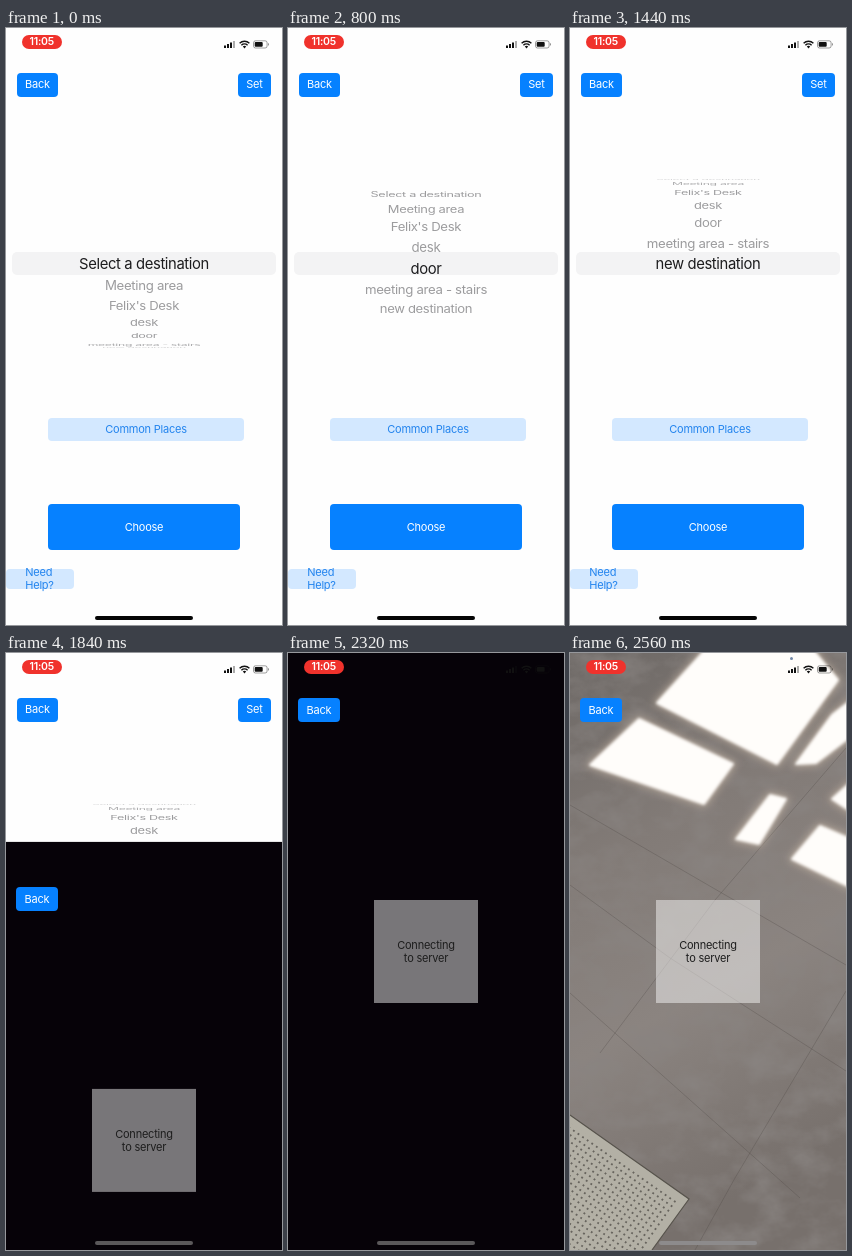
Recreate the animation shown at these times as an HTML page. Size 276 px wide and 597 px high, loop 2.64 s.

```html
<!DOCTYPE html>
<html lang="en">
<head>
<meta charset="utf-8">
<title>Destination picker</title>
<style>
html, body { margin: 0; width: 100%; height: 100%; overflow: hidden; }
body { background: #fefefe; }
#stage {
  position: relative; width: 276px; height: 597px; overflow: hidden;
  background: #fefefe; font: 11px/13px Inter, sans-serif; letter-spacing: -.02em;
}
#stage div, #stage svg { position: absolute; }
.btn {
  display: flex; align-items: center; justify-content: center;
  border-radius: 4px; background: #0681ff; color: #fff;
}
.soft { background: #d3e8ff; color: #2384ee; }
.back { left: 11px; top: 45px; width: 41px; height: 23.5px; }
.set { left: 232px; top: 45px; width: 33px; height: 23.5px; }
.common { left: 42px; top: 390px; width: 196px; height: 23px; }
.choose { left: 42px; top: 476px; width: 192px; height: 46px; }
.help { left: 0; top: 540.5px; width: 67.5px; height: 20.5px; }
.help span { width: 29px; }

.row {
  left: 0; width: 276px; top: -11px; line-height: 22px; text-align: center;
  white-space: nowrap; letter-spacing: -.025em;
}
#wheel { left: 0; top: 235.5px; font-size: 13.3px; color: #9b9b9d; }
#band {
  left: 6px; top: 224px; width: 264px; height: 23px; border-radius: 5px;
  background: #f3f3f4; overflow: hidden; font-size: 14.8px; color: #1c1c1e;
}
#lens { left: -6px; top: 11.5px; }

#sheet { left: 0; top: 0; width: 276px; height: 597px; background: #060208; }
#sheet .back { left: 10px; width: 42px; height: 24px; }
.card {
  left: 86px; top: 247px; width: 104px; height: 103px;
  display: flex; align-items: center; justify-content: center; text-align: center;
  background: rgba(255, 255, 255, .46); color: #1d1d1d;
}
.clock {
  left: 15.5px; top: 7px; width: 40.5px; height: 14px; border-radius: 7px;
  background: #f0322c; color: #fff; font-size: 10.5px; font-weight: 600;
  line-height: 14px; text-align: center;
}
#home { left: 89px; top: 588.3px; width: 98px; height: 3.4px; border-radius: 2px; }
</style>
</head>
<body>
<div id="stage">
  <div class="btn back">Back</div>
  <div class="btn set">Set</div>
  <div id="wheel"></div>
  <div id="band"><div id="lens"></div></div>
  <div class="btn soft common">Common Places</div>
  <div class="btn choose">Choose</div>
  <div class="btn soft help"><span>Need Help?</span></div>

  <div id="sheet">
    <svg id="camera" width="276" height="597" viewBox="0 0 276 597">
      <defs>
        <linearGradient id="floor" x1="0" y1="0" x2=".25" y2="1">
          <stop offset="0" stop-color="#6d6865"/>
          <stop offset=".35" stop-color="#827b77"/>
          <stop offset=".65" stop-color="#8b8480"/>
          <stop offset="1" stop-color="#77706c"/>
        </linearGradient>
        <filter id="mottle" x="0" y="0" width="100%" height="100%">
          <feTurbulence type="fractalNoise" baseFrequency=".028 .04" numOctaves="5" seed="8"/>
          <feColorMatrix values="0 0 0 0 .25  0 0 0 0 .23  0 0 0 0 .22  1.6 0 0 0 -.62"/>
        </filter>
        <filter id="blur"><feGaussianBlur stdDeviation="1.6"/></filter>
        <filter id="glow"><feGaussianBlur stdDeviation="4"/></filter>
        <pattern id="holes" width="5.6" height="5.6" patternUnits="userSpaceOnUse" patternTransform="rotate(35)">
          <circle cx="2.8" cy="2.8" r="1" fill="#55524c"/>
        </pattern>
        <path id="sun" d="M87 50L136 -4H242L268 27L207 111Z
          M20 112L69 66L163 111L134 151Z
          M166 186L189 191L216 146L200 142Z
          M226 111L262 62L280 48V84L246 110Z
          M222 206L250 173L280 186V234Z
          M262 146L280 130V158Z"/>
      </defs>
      <rect width="276" height="597" fill="url(#floor)"/>
      <rect width="276" height="597" filter="url(#mottle)"/>
      <path d="M0 152L276 312M0 232L100 305L276 418M0 340L230 545M276 95L145 247L30 400M276 338L165 525L125 597"
        fill="none" stroke="#4d4744" stroke-opacity=".35" stroke-width=".9"/>
      <use href="#sun" fill="#d9c5b0" stroke="#d9c5b0" stroke-width="5" opacity=".6" filter="url(#glow)"/>
      <use href="#sun" fill="#fffdfa" stroke="#fffdfa" stroke-width="2" stroke-linejoin="round" filter="url(#blur)"/>
      <path d="M0 462L119 546L82 597H0Z" fill="#b3b0a5"/>
      <path d="M0 470L109 547L74 597H0Z" fill="url(#holes)"/>
      <path d="M0 462L119 546L82 597" fill="none" stroke="#57534c" stroke-width="1.2"/>
      <circle cx="221.5" cy="5.5" r="1.5" fill="#7389a8"/>
    </svg>
    <div class="card">Connecting<br>to server</div>
    <div class="btn back">Back</div>
  </div>

  <div class="clock">11:05</div>
  <svg width="276" height="30" fill="#111">
    <path d="M218 17.5h2v2.5h-2zM221 16h2v4h-2zM224 14.5h2v5.5h-2z"/>
    <path d="M227 13h2v7h-2z" opacity=".35"/>
    <path d="M233.6 15.2a7 7 0 0 1 9.8 0M235.4 17.2a4.4 4.4 0 0 1 6.2 0" fill="none" stroke="#111" stroke-width="1.4"/>
    <path d="M236.8 18.6a2.5 2.5 0 0 1 3.4 0L238.500 20.400Z"/>
    <rect x="247.500" y="12.800" width="13.600" height="7.200" rx="2" fill="none" stroke="#111" stroke-opacity=".5" stroke-width=".8"/>
    <rect x="248.700" y="14" width="8" height="4.800" rx="1"/>
    <path d="M262 15a1.500 1.500 0 0 1 0 2.800z" opacity=".5"/>
  </svg>
  <div id="home"></div>
</div>

<script>
const LOOP = 2640, STEP = 80;
const RADIUS = 84, PITCH = 14.7 * Math.PI / 180;
const NAMES = ['Select a destination', 'Meeting area', 'Felix\'s Desk', 'desk', 'door',
  'meeting area - stairs', 'new destination'];

const $ = id => document.getElementById(id);
const clamp = x => Math.min(1, Math.max(0, x));

function fill(box) {
  return NAMES.map(name => {
    const row = document.createElement('div');
    row.className = 'row';
    row.textContent = name;
    $(box).append(row);
    return row;
  });
}
const outer = fill('wheel'), inner = fill('lens');

// Rows sit on a drum seen from the front.
function turn(pos) {
  NAMES.forEach((_, i) => {
    const angle = (i - pos) * PITCH;
    const y = RADIUS * Math.sin(angle), depth = Math.cos(angle);
    const size = 1 - .115 * (1 - depth);
    outer[i].style.transform =
      `translateY(${y}px) scale(${size}, ${size * Math.max(.06, depth)})`;
    outer[i].style.opacity = .6 + .4 * clamp(depth * 2);
    inner[i].style.transform = `translateY(${y}px)`;
  });
}

function scrollAt(t) {
  const x = clamp((t - 100) / 1190);
  return 6 * x * x * (3 - 2 * x);
}

// Critically damped spring, from the bottom edge to the top.
function sheetAt(t) {
  const u = Math.max(0, t - 1685) * .01525;
  const y = 597 * (1 + u) * Math.exp(-u);
  return y < .6 ? 0 : y;
}

function draw(t) {
  const live = t >= 2400;
  turn(scrollAt(t));
  $('sheet').style.transform = `translateY(${sheetAt(t)}px)`;
  $('camera').style.visibility = live ? 'visible' : 'hidden';
  $('home').style.background = live ? '#8d8b8c' : t >= 1760 ? '#5a585a' : '#050505';
}

const start = performance.now();
function tick() {
  const t = (performance.now() - start) % LOOP;
  draw(Math.floor(t / STEP) * STEP);
  requestAnimationFrame(tick);
}
tick();
</script>
</body>
</html>
```
